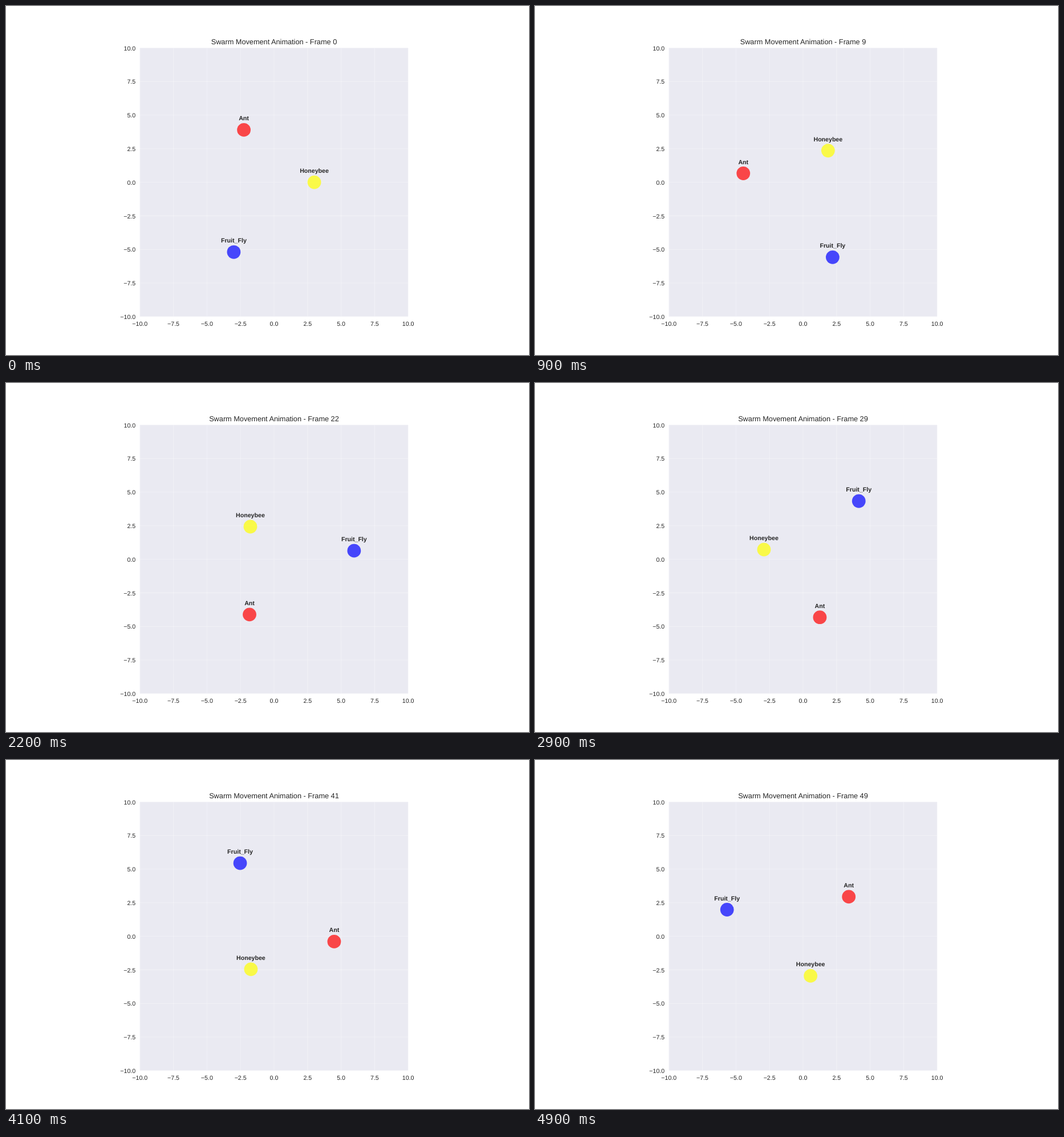
An HTML page that plays this animation: 917 by 611 pixels, repeating every 5 s.

```html
<!DOCTYPE html>
<html lang="en">
<head>
<meta charset="utf-8">
<title>Swarm Movement</title>
<style>
  html, body { margin: 0; width: 100%; height: 100%; overflow: hidden; background: #fff; }
  svg { display: block; width: 917px; height: 611px; }
  text {
    font: 10.61px "Liberation Sans", Arial, sans-serif;
    fill: #262626;
    text-anchor: middle;
    text-rendering: geometricPrecision;
  }
  .title { font-size: 12.73px; }
  .name { font-weight: bold; }
  .y { text-anchor: end; }
</style>
</head>
<body>
<svg viewBox="0 0 917 611"></svg>
<script>
const svg = document.querySelector('svg');
const CX = 469.96, CY = 308.55, UNIT = 23.523;
const LEFT = CX - 10 * UNIT, TOP = CY - 10 * UNIT, SIZE = 20 * UNIT;
const px = x => CX + x * UNIT;
const py = y => CY - y * UNIT;

function add(tag, attrs, text = '', parent = svg) {
  const el = document.createElementNS('http://www.w3.org/2000/svg', tag);
  for (const key in attrs) el.setAttribute(key, attrs[key]);
  el.textContent = text;
  return parent.appendChild(el);
}

// Plot area, grid and tick labels
const clip = add('clipPath', { id: 'plot' });
const box = { x: LEFT, y: TOP, width: SIZE, height: SIZE };
add('rect', box, '', clip);
add('rect', { ...box, fill: '#eaeaf2' });
const grid = add('g', { 'clip-path': 'url(#plot)', stroke: '#fff', 'stroke-opacity': 0.3, 'stroke-width': 1.06 });

for (let v = -10; v <= 10; v += 2.5) {
  const label = v.toFixed(1).replace('-', '\u2212');
  add('path', { d: `M${px(v)} ${TOP}v${SIZE}M${LEFT} ${py(v)}h${SIZE}` }, '', grid);
  add('text', { x: px(v), y: 559.7 }, label);
  add('text', { x: LEFT - 7.5, y: py(v) + 4.2, class: 'y' }, label);
}

const title = add('text', { x: CX, y: 67, class: 'title' });

// Each insect circles the centre at its own radius
const insects = [
  ['Honeybee', '#ff0'],
  ['Ant', '#f00'],
  ['Fruit_Fly', '#00f']
].map(([name, fill], i) => ({
  radius: 3 + 1.5 * i,
  phase: i * 2 * Math.PI / 3,
  dot: add('circle', { r: 11.9, fill, 'fill-opacity': 0.7 }),
  label: add('text', { class: 'name' }, name)
}));

function place(el, x, y) {
  el.setAttribute('transform', `translate(${px(x)} ${py(y)})`);
}

const start = performance.now();

function draw(now) {
  const step = Math.floor(Math.max(0, now - start) % 5000 / 100);
  title.textContent = `Swarm Movement Animation - Frame ${step}`;
  for (const { radius, phase, dot, label } of insects) {
    const angle = phase + step * 0.1;
    const x = radius * Math.cos(angle), y = radius * Math.sin(angle);
    place(dot, x, y);
    place(label, x, y + 0.7);
  }
  requestAnimationFrame(draw);
}
draw(start);
</script>
</body>
</html>
```
